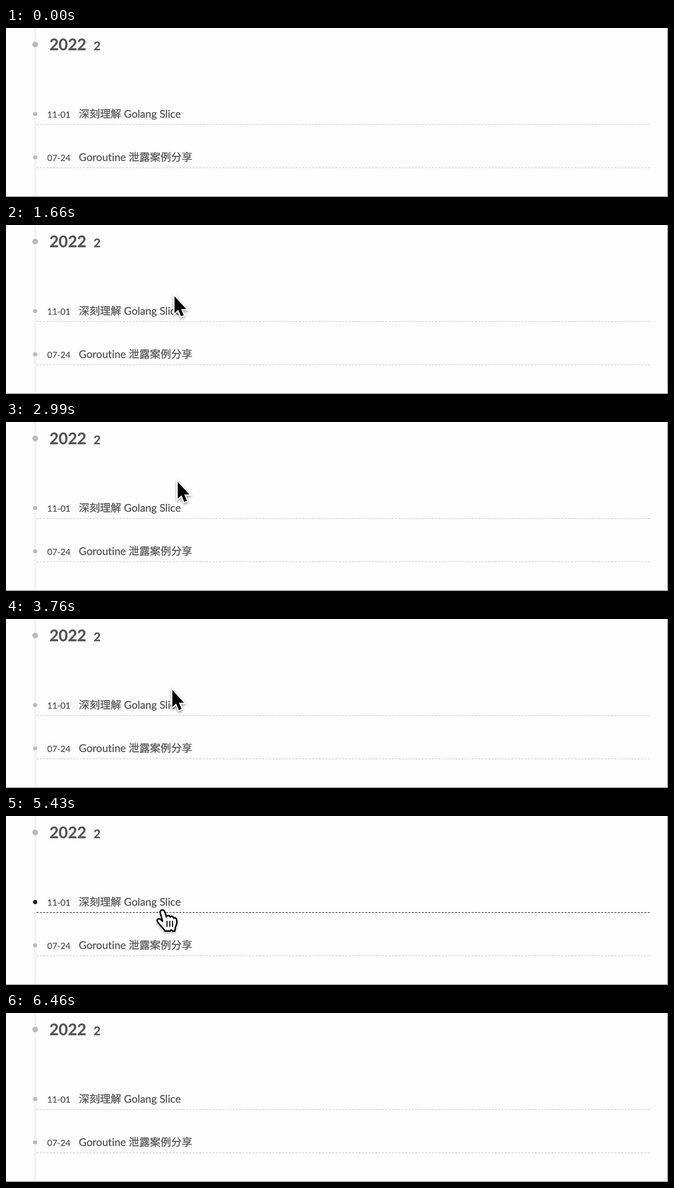
An HTML page with a canvas for the animation above (6.84 s loop, 1280 px wide and 328 px high).

```html
<!DOCTYPE html>
<html lang="zh-CN">
<head>
<meta charset="utf-8">
<title>Archive timeline</title>
<style>
  html, body { margin: 0; width: 100%; height: 100%; overflow: hidden; background: #fefefe; }
  canvas, svg { position: absolute; left: 0; top: 0; width: 1280px; height: 328px; }
  text {
    font-family: Lato, "Noto Sans CJK SC", "Noto Sans CJK", sans-serif;
    font-variant-ligatures: none;
    text-rendering: geometricPrecision;
    white-space: pre;
    fill: #555;
    stroke: #555;
    stroke-width: .35px;
  }
  .year { font-size: 30.75px; font-weight: 700; }
  .count { font-size: 23px; font-weight: 700; }
  .date { font-size: 16.66px; }
  .title { font-size: 20.5px; }
</style>
</head>
<body>
<canvas id="back" width="1280" height="328"></canvas>
<svg viewBox="0 0 1280 328">
  <text class="year" x="84" y="43.4">2022</text>
  <text class="count" x="169.5" y="43.4">2</text>
  <text class="date" x="79.8" y="174.3">11-01</text>
  <text class="title" x="140.8" y="174.3">深刻理解 Golang Slice</text>
  <text class="date" x="79.8" y="258.3">07-24</text>
  <text class="title" x="140.8" y="258.3">Goroutine 泄露案例分享</text>
</svg>
<canvas id="front" width="1280" height="328"></canvas>
<script>
const LOOP = 6840;
const HAND_Y = 153;
const back = document.getElementById('back').getContext('2d');
const front = document.getElementById('front').getContext('2d');

const clamp = v => Math.max(0, Math.min(1, v));
const smooth = v => v * v * (3 - 2 * v);
const easeIn = v => v * v;
const easeOut = v => 1 - (1 - v) * (1 - v);
const mix = (a, b, k) => a + (b - a) * k;

// Pointer moves: span and steps, target, easing; move and fade are ranges of progress
const START = { x: 646, y: 414 };
const MOVES = [
  { t0: 370,  t1: 500,  n: 4,  x: 412,   y: 159,   ease: easeOut },
  { t0: 720,  t1: 850,  n: 4,  x: 351,   y: 101,   ease: easeOut },
  { t0: 1320, t1: 1960, n: 16, x: 300.5, y: 175.5, fade: [0.56, 0.92], hover: 1 },
  { t0: 2730, t1: 2990, n: 7,  x: 332,   y: 116,   move: [0.12, 0.57], fade: [0.36, 1], hover: 0 },
  { t0: 3550, t1: 4100, n: 13, x: 300.5, y: 182,   fade: [0.5, 0.9], hover: 1 },
  { t0: 5430, t1: 5690, n: 7,  x: 456,   y: 123,   move: [0.12, 0.57], fade: [0.36, 1], hover: 0 },
  { t0: 6290, t1: 6460, n: 5,  x: 603,   y: 415,   ease: easeIn }
];

function stateAt(t) {
  const s = { ...START, hover: 0 };
  for (const m of MOVES) {
    if (t < m.t0) break;
    const step = Math.floor((t - m.t0) / (m.t1 - m.t0) * (m.n - 1) + 1e-6);
    const p = Math.min(1, (step + 1) / m.n);
    const part = ([a, b]) => clamp((p - a) / (b - a));
    const k = (m.ease || smooth)(part(m.move || [0, 1]));
    s.x = mix(s.x, m.x, k);
    s.y = mix(s.y, m.y, k);
    if (m.fade) s.hover = mix(s.hover, m.hover, smooth(part(m.fade)));
  }
  return s;
}

function grey(v) {
  const c = Math.round(v);
  return `rgb(${c},${c},${c})`;
}

function dot(x, y, r, color) {
  back.fillStyle = color;
  back.beginPath();
  back.arc(x, y, r, 0, Math.PI * 2);
  back.fill();
}

// A dashed rule whose gaps are fitted so that it ends on a full dash
function rule(x0, x1, y, color) {
  const dash = 3.84, gap = 2.56, len = x1 - x0;
  const count = Math.floor((len + gap) / (dash + gap));
  back.strokeStyle = color;
  back.lineWidth = 1.28;
  back.setLineDash([dash, (len - count * dash) / (count - 1)]);
  back.beginPath();
  back.moveTo(x0, y);
  back.lineTo(x1, y);
  back.stroke();
}

function post(y, hover) {
  dot(56.4, y, 5.1, '#fefefe');
  dot(56.4, y, 4.1, grey(mix(187, 34, hover)));
  rule(59, 1244.5, y + 20.4, grey(mix(200, 34, hover)));
}

function drawPage(hover) {
  back.fillStyle = '#fefefe';
  back.fillRect(0, 0, 1280, 328);
  back.fillStyle = '#f4f4f4';
  back.fillRect(53.9, 0, 5.1, 327);
  dot(56.4, 32, 5.6, '#bbb');
  post(167, hover);
  post(251, 0);
  back.fillStyle = '#666';
  back.fillRect(0, 327, 1280, 1);
  back.fillRect(1279, 0, 1, 328);
}

const ARROW = new Path2D('M0 0V33L7.3 26.2L12.6 39L17.9 36.8L12.7 24.8H22.6Z');
const HAND = new Path2D(
  'M-4.2 5C-5.2 .2 2.6 -1.8 4.6 3.6L8 14C9 10.4 14.6 10.6 15.6 14.6' +
  'C17 11.6 22 12.6 22.8 16.8C24.4 14.6 28.2 16 28.6 20.4C29.6 26 28 30.5 25.8 34.5' +
  'L25 41.8H20.5L18.3 39.5L15.5 41.8H5.2C3.6 37 -4.5 31.5 -9.4 23.6' +
  'C-12.4 18.4 -6.6 16.4 -3 19.4L.6 23Z');
const FOLDS = new Path2D('M9.3 22.5V33M14.9 22.5V33M20.4 22.5V33');

function shadow(on) {
  front.shadowColor = on ? 'rgba(0,0,0,.42)' : 'transparent';
  front.shadowBlur = on ? 5 : 0;
  front.shadowOffsetY = on ? 2.5 : 0;
}

function drawArrow() {
  front.lineJoin = 'miter';
  front.lineWidth = 4.4;
  front.strokeStyle = '#fff';
  shadow(true);
  front.stroke(ARROW);
  shadow(false);
  front.fillStyle = '#000';
  front.fill(ARROW);
}

function drawHand() {
  front.translate(0.6, 0.6);
  front.scale(0.97, 0.98);
  front.lineJoin = front.lineCap = 'round';
  front.lineWidth = 2.7;
  front.strokeStyle = '#000';
  shadow(true);
  front.stroke(HAND);
  shadow(false);
  front.fillStyle = '#fff';
  front.fill(HAND);
  front.stroke(HAND);
  front.lineWidth = 2.1;
  front.stroke(FOLDS);
}

function draw(now) {
  const s = stateAt(now % LOOP);
  drawPage(s.hover);
  front.clearRect(0, 0, 1280, 328);
  front.save();
  front.beginPath();
  front.rect(0, 0, 1279, 327);
  front.clip();
  front.translate(s.x, s.y);
  const onTitle = s.y > HAND_Y && s.y < 185 && s.x > 141 && s.x < 338;
  if (onTitle) drawHand();
  else drawArrow();
  front.restore();
}

const begin = performance.now();
function tick() {
  draw(performance.now() - begin);
  requestAnimationFrame(tick);
}
tick();
</script>
</body>
</html>
```
